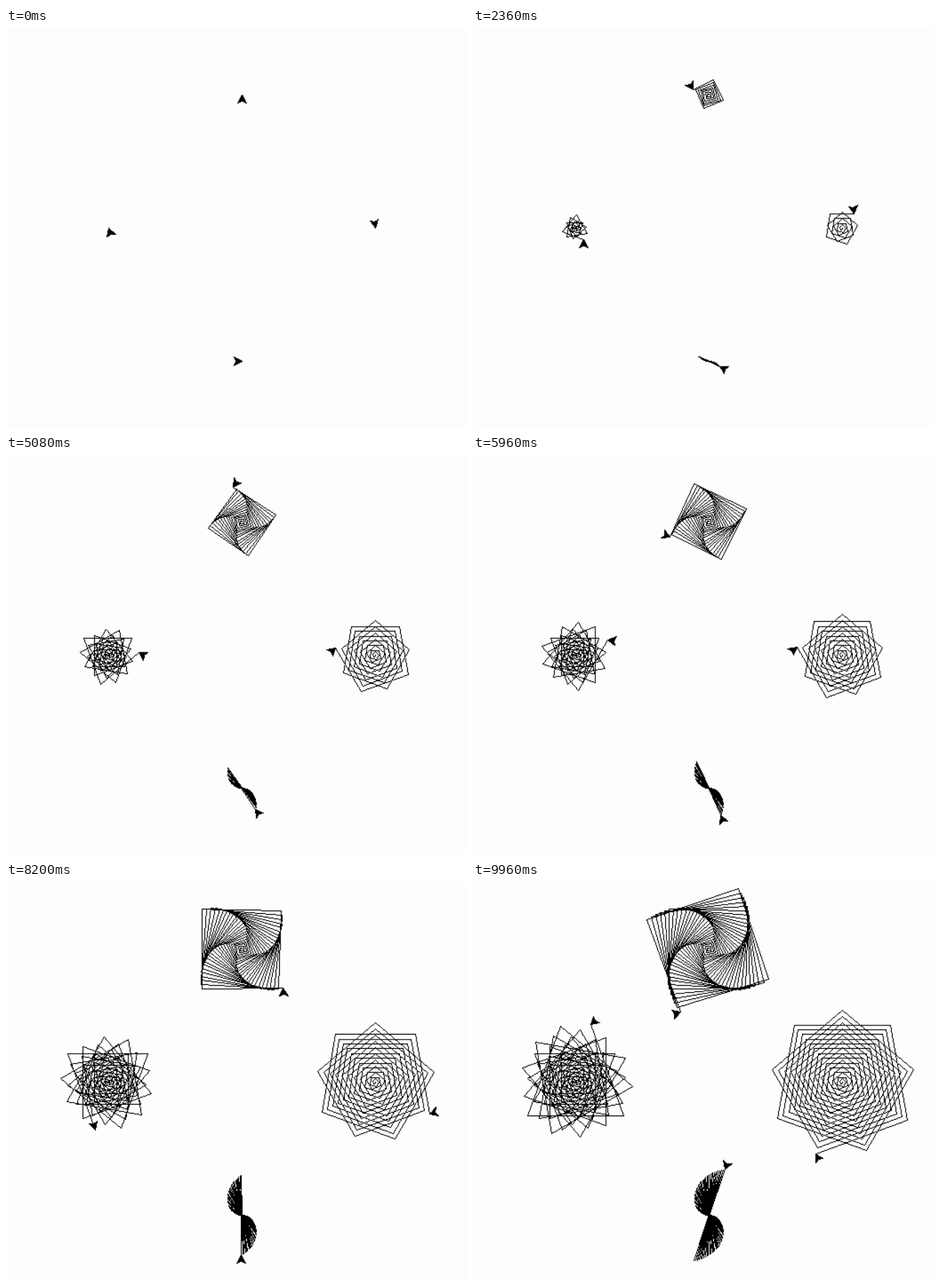
These frames come from a looping animation (648x562 px, 10000 ms). An HTML page with a canvas:

```html
<!DOCTYPE html>
<html lang="en">
<head>
<meta charset="utf-8">
<title>Turtle spirals</title>
<style>
  html, body { margin: 0; width: 100%; height: 100%; overflow: hidden; background: #fcfefc; }
  canvas { display: block; }
</style>
</head>
<body>
<canvas id="stage" width="648" height="562"></canvas>
<script>
const LOOP = 10000, TICK = 40, STEPS = 114;

// Everything is plotted on a small pixel screen and enlarged to the stage.
const ZOOM = 1.25, WIDTH = 519, HEIGHT = 450, CX = 265, CY = 225, REACH = 150;
const stage = document.getElementById('stage').getContext('2d');
const screen = document.createElement('canvas');
screen.width = WIDTH;
screen.height = HEIGHT;
const ctx = screen.getContext('2d');

// In drawing order: start point and left turn in degrees after each move.
const turtles = [
  { x: CX + REACH, y: CY, turn: -80 },
  { x: CX, y: CY - REACH, turn: 91 },
  { x: CX - REACH, y: CY, turn: 110 },
  { x: CX, y: CY + REACH, turn: 179 }
];
const cursor = [[0, 0], [-9, 5], [-7, 0], [-9, -5]];

// Pace of the commands: [tick, commands done].
const pace = [[0, 6.5], [33, 123.5], [84, 309.5], [127, 460.5],
              [171, 612.5], [205, 733.5], [249, 884.5]];

const rad = deg => deg * Math.PI / 180;

// Move i goes i pixels forward.
for (const t of turtles) {
  let { x, y } = t;
  t.path = [[x, y]];
  for (let i = 0; i < STEPS; i++) {
    const a = rad(t.turn * i);
    x += i * Math.cos(a);
    y -= i * Math.sin(a);
    t.path.push([x, y]);
  }
}

function commandsAt(tick) {
  let k = 1;
  while (k < pace.length - 1 && tick > pace[k][0]) k++;
  const [t0, c0] = pace[k - 1], [t1, c1] = pace[k];
  return Math.floor(c0 + (c1 - c0) * (tick - t0) / (t1 - t0));
}

// One-pixel line without smoothing.
function line(a, b) {
  const [x0, y0, x1, y1] = [...a, ...b].map(Math.round);
  const dx = x1 - x0, dy = y1 - y0;
  const n = Math.max(Math.abs(dx), Math.abs(dy), 1);
  for (let k = 0; k <= n; k++) {
    ctx.fillRect(Math.round(x0 + dx * k / n), Math.round(y0 + dy * k / n), 1, 1);
  }
}

function arrow([x, y], heading) {
  const c = Math.cos(rad(heading)), s = Math.sin(rad(heading));
  const points = cursor.map(([u, v]) =>
    [Math.round(x + u * c - v * s), Math.round(y - u * s - v * c)]);
  ctx.beginPath();
  points.forEach(([px, py]) => ctx.lineTo(px + 0.5, py + 0.5));
  ctx.fill();
  points.forEach((p, i) => line(p, points[(i + 1) % points.length]));
}

function draw(tick) {
  const done = commandsAt(tick);
  ctx.fillStyle = '#fcfefc';
  ctx.fillRect(0, 0, WIDTH, HEIGHT);
  ctx.fillStyle = '#000';
  turtles.forEach((t, j) => {
    // Each round has eight commands: a move and a turn per turtle.
    const moves = Math.floor((done - 2 * j - 1) / 8) + 1;
    const turns = Math.floor((done - 2 * j - 2) / 8) + 1;
    for (let i = 2; i <= moves; i++) line(t.path[i - 1], t.path[i]);
    arrow(t.path[moves], turns * t.turn);
  });
  stage.drawImage(screen, 0, 0, WIDTH * ZOOM, HEIGHT * ZOOM);
}

const start = performance.now();
let shown = -1;

function frame() {
  const tick = Math.floor((performance.now() - start) % LOOP / TICK);
  if (tick !== shown) draw(shown = tick);
  requestAnimationFrame(frame);
}
frame();
</script>
</body>
</html>
```
